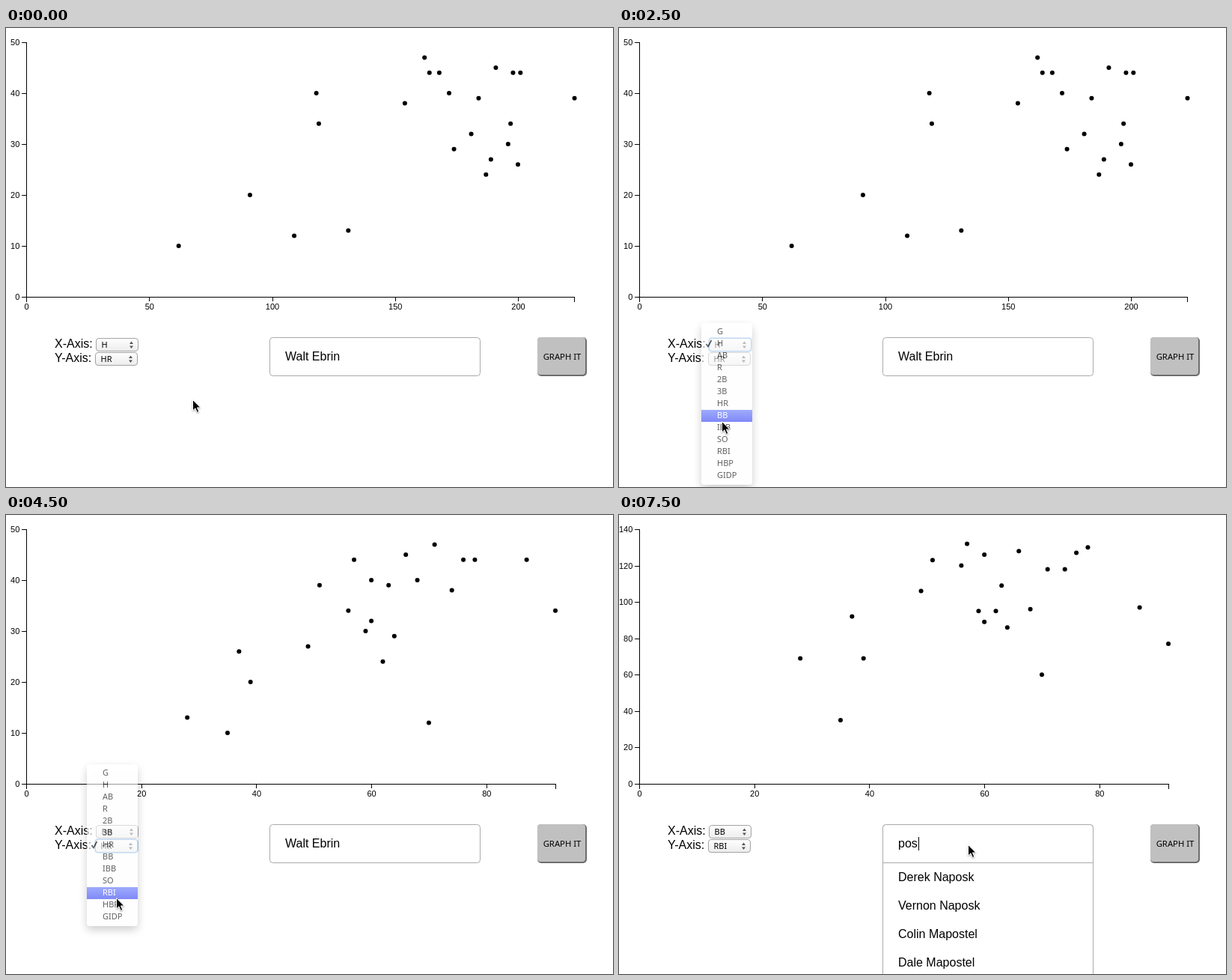
An HTML page for the animation above (8000 ms loop, 811 by 613 pixels).

```html
<!DOCTYPE html>
<html>
<head>
<meta charset="utf-8">
<style>
html, body { margin: 0; width: 100%; height: 100%; overflow: hidden; background: #fff; }
svg { display: block; font: 16px "Liberation Sans", Arial, sans-serif; }
.tick { font-size: 11px; }
.ui { font: 11px "Noto Sans", "Open Sans", sans-serif; }
.axis { fill: none; stroke: #000; shape-rendering: crispEdges; }
.menu { filter: drop-shadow(0 5px 6px rgba(0, 0, 0, .32)); }
.cursor { filter: drop-shadow(0 1px 1px rgba(0, 0, 0, .35)); }
</style>
</head>
<body>
<svg width="811" height="613" viewBox="0 0 811 613">
  <defs>
    <linearGradient id="face" x2="0" y2="1">
      <stop stop-color="#fff"/><stop offset="1" stop-color="#ececec"/>
    </linearGradient>
    <linearGradient id="blue" x2="0" y2="1">
      <stop stop-color="#6478fa"/><stop offset="1" stop-color="#3341f4"/>
    </linearGradient>
  </defs>
  <g id="scene"></g>
</svg>
<script>
const LOOP = 8000, STEP = 250;
const scene = document.getElementById('scene');
const options = 'G H AB R 2B 3B HR BB IBB SO RBI HBP GIDP'.split(' ');
const matches = ['Derek Naposk', 'Vernon Naposk', 'Colin Mapostel', 'Dale Mapostel'];

// One season per entry: H, HR, BB, RBI
const seasons = `131 13 28 69,189 27 49 106,200 26 37 92,198 44 57 132,196 30 59 95,
223 39 51 123,172 40 60 126,197 34 56 120,191 45 66 128,201 44 78 130,187 24 62 95,
181 32 60 89,168 44 76 127,184 39 63 109,174 29 64 86,164 44 87 97,154 38 74 118,
162 47 71 118,119 34 92 77,118 40 68 96,91 20 39 69,109 12 70 60,62 10 35 35`
  .split(',').map(row => row.trim().split(' ').map(Number));

const fields = {
  H: { col: 0, max: 223, gap: 50, scale: 3.285 },
  BB: { col: 2, max: 92, gap: 20, scale: 7.685 },
  HR: { col: 1, max: 50, gap: 10, scale: 6.8 },
  RBI: { col: 3, max: 140, gap: 20, scale: 340 / 140 }
};

// Time, pointer x, pointer y, highlighted menu row
const pointer = [
  [0, 249, 496], [250, 218, 475], [500, 172, 443], [750, 143, 427],
  [1250, 145, 428], [1500, 146, 428], [1750, 145, 430, 1], [2000, 142, 478, 4],
  [2250, 137, 527, 7], [2500, 137, 525, 7], [2750, 139, 508], [3000, 145, 474],
  [3250, 148, 452], [3500, 147, 440], [3750, 147, 441, 6], [4000, 147, 468, 8],
  [4250, 147, 508, 10], [4500, 147, 511, 10], [4750, 150, 492], [5000, 230, 476],
  [5250, 385, 452], [5500, 466, 439], [5750, 466, 440]
];

const text = (x, y, s, attrs = '') => `<text x="${x}" y="${y}" ${attrs}>${s}</text>`;
const rect = (x, y, w, h, attrs) =>
  `<rect x="${x}" y="${y}" width="${w}" height="${h}" ${attrs}/>`;
const path = (d, attrs = '') => `<path d="${d}" ${attrs}/>`;

function chart(xField, yField) {
  const fx = fields[xField], fy = fields[yField];
  const right = Math.round(27 + fx.max * fx.scale - .4) + .5;
  let lines = `M21.5 19.5H27.5V359.5H21.5M27.5 365.5V359.5H${right}V365.5`;
  let out = '';
  for (let v = 0; v <= fx.max; v += fx.gap) {
    const x = 27.5 + v * fx.scale;
    lines += `M${Math.floor(x) + .5} 359.5V365`;
    out += text(x, 376, v, 'class="tick" text-anchor="middle"');
  }
  for (let v = 0; v <= fy.max; v += fy.gap) {
    const y = 359 - v * fy.scale;
    lines += `M21 ${Math.round(y) + .5}H27.5`;
    out += text(18.3, y + 4, v, 'class="tick" text-anchor="end"');
  }
  for (const s of seasons)
    out += `<circle cx="${27 + s[fx.col] * fx.scale}" cy="${359 - s[fy.col] * fy.scale}" r="3"/>`;
  return path(lines, 'class="axis"') + out;
}

function select(x, y, value, focused) {
  const ring = focused
    ? rect(x - 1, y - 1, 59, 20, 'rx="5" fill="#a9cdf0"') +
      rect(x, y, 57, 18, 'rx="4" fill="#5e9bd8"')
    : '';
  return ring +
    rect(x + .5, y + .5, 56, 17, `rx="3.5" fill="url(#face)" stroke="${focused ? '#6ba3da' : '#a3a3a3'}"`) +
    text(x + 7.5, y + 13, value, 'class="ui"') +
    path(`M${x + 45} ${y + 8}l2.5 -3.5l2.5 3.5zm0 2.5l2.5 3.5l2.5 -3.5z`, 'fill="#555"');
}

function menu(x, y, checked, active, fading) {
  let out = rect(x, y, 68, 216, 'rx="4" fill="#fff" fill-opacity=".97"');
  options.forEach((name, i) => {
    const top = y + 3 + i * 16;
    if (i === active) out += rect(x, top + 1, 68, 16, 'fill="url(#blue)"');
    const color = i === active ? '#fff' : '#000';
    out += text(x + 21, top + 12, name, `fill="${color}"`);
    if (i === checked)
      out += path(`M${x + 6.5} ${top + 9}l2.5 3.5l4.5 -8.5`,
        `fill="none" stroke="${color}" stroke-width="1.7"`);
  });
  return `<g class="ui menu" opacity="${fading ? .62 : 1}">${out}</g>`;
}

function search(t) {
  const typed = t < 7000 ? '' : 'pos'.slice(0, (t - 7000) / STEP + 1);
  const border = 'fill="#fff" stroke="#aaa"';
  let out = rect(352.5, 413.5, 281, 51, `rx="4" ${border}`);
  if (t >= 7250) {
    out += path('M352.5 620V417.5q0 -4 4 -4H629.5q4 0 4 4V620M352.5 464.5H633.5', border);
    matches.forEach((name, i) => out += text(373, 489 + i * 38, name));
  }
  if (t >= 6000 && !typed) out += rect(373, 430, 84, 18, 'fill="#b4d5fe"');
  out += text(373, 444, typed || 'Walt Ebrin');
  if (typed) out += rect([382, 391, 400][typed.length - 1], 430, 1, 18, '');
  return out;
}

function draw(t) {
  const [, px, py, row] = pointer.filter(p => p[0] <= t).pop();
  const xField = t < 2750 ? 'H' : 'BB';
  const yField = t < 4750 ? 'HR' : 'RBI';
  let out = chart(xField, yField) +
    text(65, 427, 'X-Axis:') + text(65, 446, 'Y-Axis:') +
    select(120, 414, xField, t >= 1750 && t < 3750) +
    select(119, 433, yField, t >= 3750 && t < 5750) +
    search(t) +
    rect(710, 413, 66, 52, 'rx="5" fill="#6c6c6c"') +
    rect(710, 413, 64, 50, 'rx="4" fill="#c0c0c0"') +
    text(743, 443, 'GRAPH IT', 'class="ui" text-anchor="middle" style="font-size:11.3px"');
  if (row !== undefined)
    out += t < 3000 ? menu(110, 394, 1, row, t >= 2500) : menu(108, 333, 6, row, t >= 4500);
  out += path(`M${px + .5} ${py + .5}v14.5l3.4 -3.2l2.5 5.6l2.4 -1l-2.4 -5.4h4.4z`,
    'class="cursor" stroke="#fff" stroke-width="1"');
  scene.innerHTML = out;
}

let shown = -1;
const start = performance.now();
function tick() {
  const t = Math.floor((performance.now() - start) % LOOP / STEP) * STEP;
  if (t !== shown) draw(shown = t);
  requestAnimationFrame(tick);
}
tick();
</script>
</body>
</html>
```
